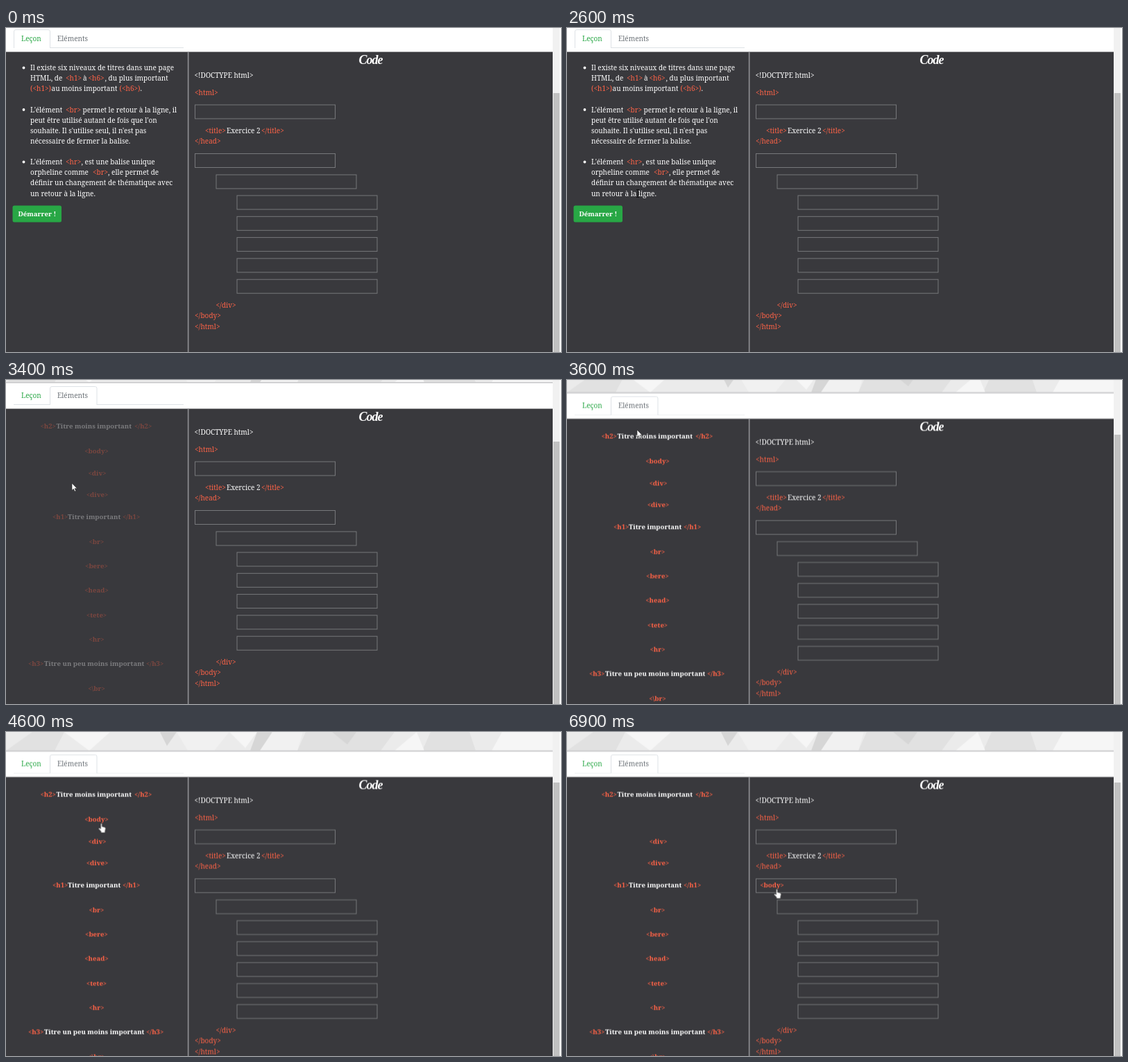
Animation of 800x468 px, one loop 7100 ms. Source, as an HTML page:

```html
<!DOCTYPE html>
<html lang="fr">
<head>
<meta charset="utf-8">
<title>Exercice HTML</title>
<style>
html, body { margin: 0; width: 100%; height: 100%; overflow: hidden; background: #fff; }
svg { display: block; width: 800px; height: 468px; }
text { font: 10px "Noto Serif", serif; fill: #fff; white-space: pre; }
.tag { fill: #ff6347; }
#elements text, .bold { font-size: 9.6px; font-weight: 700; }
#elements text { fill: #ff6347; }
#elements .word { fill: #fff; }
.green { fill: #28a745; }
.grey { fill: #6a7076; }
.title { font: italic 700 18px "Liberation Serif", serif; letter-spacing: -1px; }
.field { fill: none; stroke: #77787b; }
.edge { fill: #fff; stroke: #dee2e6; }
</style>
</head>
<body>
<svg viewBox="0 0 800 468">
  <rect width="800" height="468" fill="#fff"/>
  <g id="page">
    <g transform="translate(0 -30.5)">
      <path fill="#ebebeb" d="M0 0H788V27H0z"/>
      <path fill="#e1e1e1" d="M0 27 38 0H84L70 27zM420 27 432 0H560L540 27zM600 27 612 0H668L677 27z"/>
      <path fill="#f6f6f6" d="M84 0 120 27 150 0zM322 0 345 23 362 0zM560 27 592 0 603 27zM700 27 715 0H788V27z"/>
      <path fill="#d6d6d6" d="M222 0H246L232 20zM362 0 352 27H366L384 0zM470 0 492 18 505 0z"/>
      <path fill="#f1f1f1" d="M246 0 262 27H300L322 0zM384 0 366 27H420L428 0z"/>
      <path fill="#c6c6c8" d="M0 26.6H788V28H0z"/>
    </g>
    <path fill="#39393d" d="M0 34.5H788V520H0z"/>
    <path fill="#8d8d91" d="M261.8 34.5h1.7V520h-1.7z"/>

    <path d="M11 28.5H256" stroke="#dee2e6"/>
    <path class="edge" id="tabA" d="M11.5 29V5q0-2.500 2.500-2.500H61q2.500 0 2.500 2.500V29" />
    <path class="edge" id="tabB" d="M63.500 29V5q0-2.500 2.500-2.500H128.500q2.500 0 2.500 2.500V29"/>
    <text class="green" x="22" y="19">Leçon</text>
    <text class="grey" x="74" y="19">Eléments</text>

    <g id="lesson">
      <g fill="#fff"><circle cx="25.500" cy="57.500" r="1.900"/><circle cx="25.500" cy="118" r="1.900"/><circle cx="25.500" cy="193.500" r="1.900"/></g>
      <text x="35" y="60.500">Il existe six niveaux de titres dans une page</text>
      <text y="75.500"><tspan x="35">HTML, de</tspan><tspan class="tag" x="86">&lt;h1&gt;</tspan><tspan x="111">à</tspan><tspan class="tag" x="118.500">&lt;h6&gt;</tspan><tspan x="142.500">, du plus important</tspan></text>
      <text y="90.500"><tspan class="tag" x="35">(&lt;h1&gt;)</tspan><tspan x="65.500">au moins important</tspan><tspan class="tag" x="163.500">(&lt;h6&gt;)</tspan><tspan x="193.500">.</tspan></text>
      <text y="121.500"><tspan x="35">L'élément</tspan><tspan class="tag" x="86">&lt;br&gt;</tspan><tspan x="110.500">permet le retour à la ligne, il</tspan></text>
      <text x="35" y="136.500">peut être utilisé autant de fois que l'on</text>
      <text x="35" y="151.500">souhaite. Il s'utilise seul, il n'est pas</text>
      <text x="35" y="166.500">nécessaire de fermer la balise.</text>
      <text y="197"><tspan x="35">L'élément</tspan><tspan class="tag" x="86">&lt;hr&gt;</tspan><tspan x="108.500">, est une balise unique</tspan></text>
      <text y="212"><tspan x="35">orpheline comme</tspan><tspan class="tag" x="125">&lt;br&gt;</tspan><tspan x="147">, elle permet de</tspan></text>
      <text x="35" y="227">définir un changement de thématique avec</text>
      <text x="35" y="242.500">un retour à la ligne.</text>
      <rect x="9.500" y="256.500" width="70.500" height="24" rx="2.500" fill="#28a745"/>
      <text class="bold" x="17.500" y="272">Démarrer !</text>
    </g>

    <g id="elements" text-anchor="middle">
      <text y="63" text-anchor="start"><tspan x="49.500">&lt;h2&gt;</tspan><tspan class="word" x="72.500">Titre moins important</tspan><tspan x="185">&lt;/h2&gt;</tspan></text>
      <text x="131.500" y="131">&lt;div&gt;</text>
      <text x="131.500" y="161.500">&lt;dive&gt;</text>
      <text y="194" text-anchor="start"><tspan x="67">&lt;h1&gt;</tspan><tspan class="word" x="89">Titre important</tspan><tspan x="168">&lt;/h1&gt;</tspan></text>
      <text x="130.500" y="229.500">&lt;br&gt;</text>
      <text x="130.500" y="265">&lt;bere&gt;</text>
      <text x="130.500" y="300">&lt;head&gt;</text>
      <text x="130.500" y="335.500">&lt;tete&gt;</text>
      <text x="130.500" y="371">&lt;hr&gt;</text>
      <text y="406" text-anchor="start"><tspan x="32">&lt;h3&gt;</tspan><tspan class="word" x="55">Titre un peu moins important</tspan><tspan x="202">&lt;/h3&gt;</tspan></text>
      <text x="130.500" y="441.500">&lt;\br&gt;</text>
      <text id="chip" x="130.500" y="98.500">&lt;body&gt;</text>
    </g>

    <text class="title" x="508.500" y="51.500">Code</text>
    <text x="271.500" y="71.500">&lt;!DOCTYPE html&gt;</text>
    <text class="tag" x="272" y="96.500">&lt;html&gt;</text>
    <text y="152"><tspan class="tag" x="287">&lt;title&gt;</tspan><tspan x="318">Exercice 2</tspan><tspan class="tag" x="368">&lt;/title&gt;</tspan></text>
    <text class="tag" x="272" y="167">&lt;/head&gt;</text>
    <g class="field">
      <rect x="272.500" y="111" width="202" height="20"/>
      <rect x="272.500" y="181.500" width="202" height="20"/>
      <rect x="303" y="212" width="202" height="20"/>
      <rect x="333" y="242" width="202" height="20"/>
      <rect x="333" y="272.300" width="202" height="20"/>
      <rect x="333" y="302.600" width="202" height="20"/>
      <rect x="333" y="332.900" width="202" height="20"/>
      <rect x="333" y="363.200" width="202" height="20"/>
    </g>
    <text class="tag" x="302.500" y="404">&lt;/div&gt;</text>
    <text class="tag" x="272" y="419">&lt;/body&gt;</text>
    <text class="tag" x="272" y="434.500">&lt;/html&gt;</text>
  </g>

  <path fill="#f1f1f1" d="M788 0h10V468h-10z"/>
  <path id="thumb" fill="#c1c1c1" d="M789 94h9V520h-9z"/>

  <g id="cursor">
    <path id="arrow" fill="#fff" stroke="#222" stroke-width=".6" d="M0 0V10.500L2.400 8.300 4 12 5.700 11.200 4.100 7.700H7.400z"/>
    <path id="beam" fill="none" stroke="#111" d="M-2 -5.500H2M0 -5.500V5.500M-2 5.500H2"/>
    <path id="hand" fill="#fff" stroke="#222" stroke-width=".6" d="M-1 .8Q0-.6 1 .8V5L5 6Q6.500 6.500 6.300 8L5.500 12V14H-.5V12L-3.800 8.200Q-4-.3 7 0 0L-3.800 8.200Q-3.300 6.300-1 8z"/>
  </g>
</svg>
<script>
const LOOP = 7100, TICK = 100;
const get = id => document.getElementById(id);

// keys: [ms, value]; values advance once per tick and hold in between
function play(id, prop, keys) {
  const all = [...keys, [LOOP, keys[keys.length - 1][1]]];
  if (all[0][0] > 0) all.unshift([0, all[0][1]]);
  const frames = all.map(([ms, value], i) => ({
    offset: ms / LOOP,
    [prop]: value,
    easing: i < all.length - 1 ? `steps(${Math.max(1, Math.round((all[i + 1][0] - ms) / TICK))})` : 'linear'
  }));
  get(id).animate(frames, { duration: LOOP, iterations: Infinity, delay: -3 });
}
const move = (id, keys) =>
  play(id, 'transform', keys.map(([ms, x, y]) => [ms, `translate(${x}px, ${y}px)`]));
const show = (id, keys) => play(id, 'opacity', keys);

get('hand').setAttribute('d',
  'M-1 1Q0-.6 1 1V5L4.800 6Q6.300 6.500 6.200 8L5.300 12V14H-.7V12L-4 8.400Q-4 6.500-2.600 7L-1 8.400z');

const scroll = [[3300, 0], [3400, 7], [3500, 14.5], [3600, 21.5], [3700, 26.5], [3800, 29.5], [3900, 30.5]];
move('page', scroll.map(([ms, y]) => [ms, 0, y]));
move('thumb', scroll.map(([ms, y]) => [ms, 0, -0.69 * y]));

show('lesson', [[0, 1], [3200, 1], [3300, 0]]);
show('elements', [[0, 0], [3300, 0], [3400, 0.33], [3500, 1]]);
show('tabA', [[0, 1], [3200, 1], [3300, 0]]);
show('tabB', [[0, 0], [3200, 0], [3300, 1]]);

const drag = [[4600, 0, 0], [5000, 168, 90], [5200, 176, 93], [5600, 165, 95]];
move('chip', drag);
move('cursor', [
  [0, 585, 345], [100, 585, 345], [800, 170, 62], [1500, 150, 85], [2600, 102, 239],
  [3200, 97, 16], [3300, 97, 18], [3400, 95, 149], [3600, 101, 72], [4200, 130, 100],
  ...drag.map(([ms, x, y]) => [ms, 137.5 + x, 131.5 + y])
]);
show('cursor', [[0, 0], [100, 1]]);
show('arrow', [[0, 1], [700, 1], [800, 0], [2600, 0], [2700, 1], [3000, 1], [3100, 0], [3300, 0], [3400, 1], [4200, 1], [4300, 0]]);
show('beam', [[0, 0], [700, 0], [800, 1], [2600, 1], [2700, 0]]);
show('hand', [[0, 0], [3000, 0], [3100, 1], [3300, 1], [3400, 0], [4200, 0], [4300, 1]]);
</script>
</body>
</html>
```
